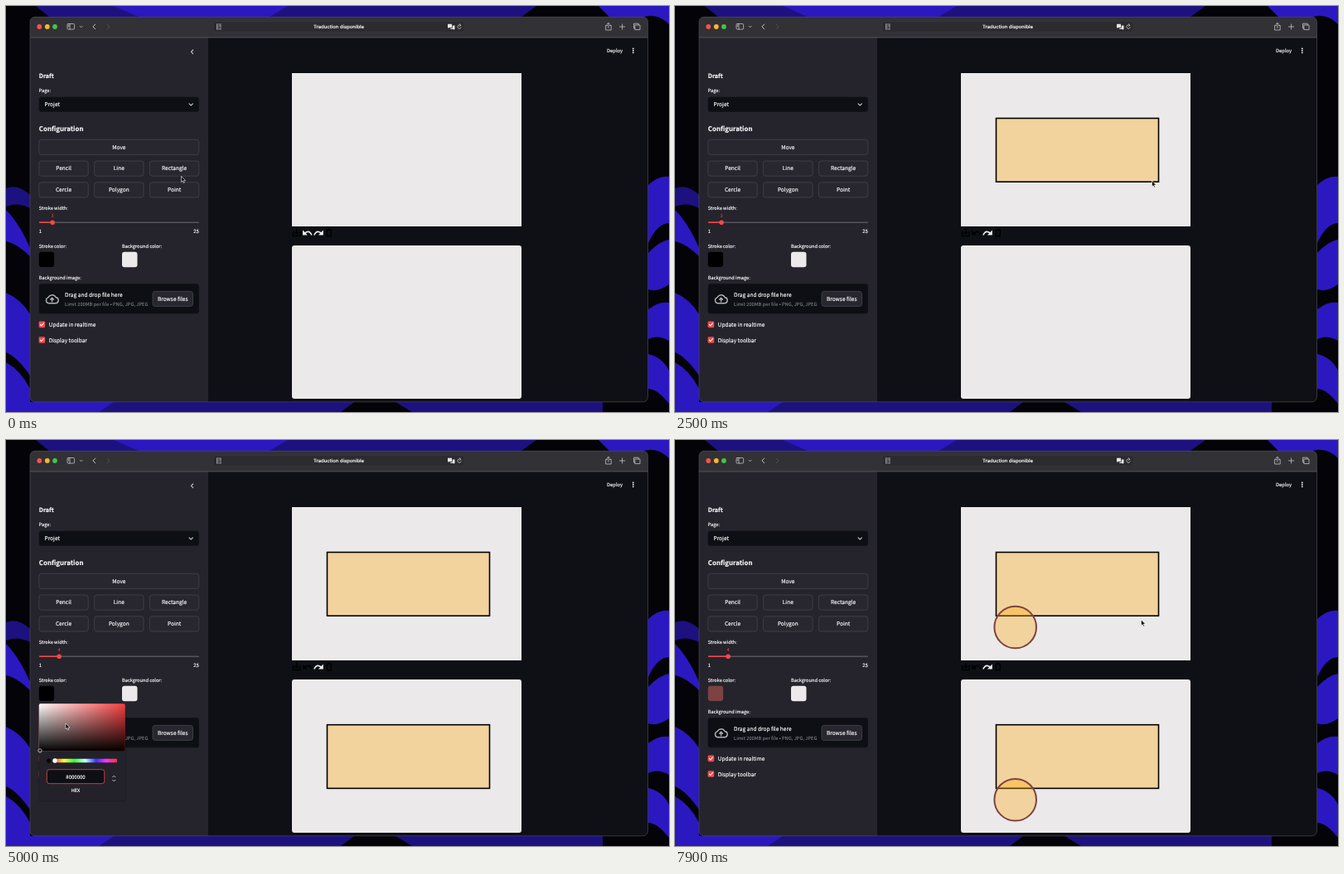
Write an HTML page that moves like this. It is 800 px wide and 490 px high and loops after 8 s.

```html
<!DOCTYPE html>
<html lang="fr">
<head>
<meta charset="utf-8">
<title>Draft</title>
<style>
html, body { margin: 0; width: 100%; height: 100%; overflow: hidden; background: #040308; }
svg { display: block; width: 800px; height: 490px; }
text {
  font: 6.56px "Noto Sans CJK JP", "Noto Sans CJK SC", "Noto Sans CJK KR", "Noto Sans", sans-serif;
  fill: #fafafc; stroke: #fafafc; stroke-width: .16; text-rendering: geometricPrecision;
}
.small { font-size: 5.65px; }
.mid { text-anchor: middle; }
.head { font-size: 7.9px; font-weight: 700; }
.title { font: 500 5.9px Inter, sans-serif; }
.line { fill: none; stroke: #c4c3c8; stroke-linecap: round; stroke-linejoin: round; }
.button { fill: #28272f; stroke: #46454e; stroke-width: .8; }
.paper { fill: #ebe9ea; }
.shape { fill: #ffa500; fill-opacity: .33; }
.red { fill: #f64848; }
</style>
</head>
<body>
<svg viewBox="0 0 800 490">
  <defs>
    <linearGradient id="white"><stop stop-color="#fff"/><stop offset="1" stop-color="#fff" stop-opacity="0"/></linearGradient>
    <linearGradient id="black" x2="0" y2="1"><stop stop-opacity="0"/><stop offset="1"/></linearGradient>
    <linearGradient id="hues">
      <stop stop-color="#f33"/><stop offset=".17" stop-color="#ff3"/><stop offset=".33" stop-color="#3f3"/>
      <stop offset=".5" stop-color="#cff"/><stop offset=".67" stop-color="#33f"/>
      <stop offset=".83" stop-color="#f3f"/><stop offset="1" stop-color="#f33"/>
    </linearGradient>
    <clipPath id="window"><rect x="29" y="13" width="745.5" height="465" rx="6"/></clipPath>
  </defs>

  <!-- wallpaper -->
  <rect width="800" height="490" fill="#040308"/>
  <path fill="#1d1180" d="M36 0H640L622 13H52zM0 220Q14 214 29 228V244Q14 236 0 242zM60 478H420L404 490H80zM470 478H720V490H490z"/>
  <path fill="#2c18c0" d="M130 0H340L318 13H160zM715 0H800V22Q786 8 770 13H728zM0 246Q16 262 29 292V302Q12 286 0 284zM0 346Q18 354 29 372V446Q14 424 0 418zM0 430Q18 440 29 462V478H130L112 490H0zM775 216Q788 204 800 206V262Q786 262 775 286zM775 298Q788 284 800 282V336Q786 346 775 342zM775 366Q788 356 800 358V404Q786 396 775 402zM775 420Q792 424 800 440V480Q786 462 775 462z"/>

  <!-- browser window -->
  <g clip-path="url(#window)">
    <rect x="29" y="13" width="746" height="465" fill="#0e1015"/>
    <rect x="29" y="38" width="215" height="440" fill="#25242c"/>
    <rect x="29" y="13" width="746" height="25" fill="#323136"/>
    <path stroke="#59585d" stroke-width=".9" d="M29 38H775"/>
  </g>
  <rect x="29" y="13.3" width="745.5" height="464.5" rx="6" fill="none" stroke="#4c4b51" stroke-width=".7"/>
  <circle cx="40.3" cy="25" r="2.9" fill="#f5534d"/>
  <circle cx="49.8" cy="25" r="2.9" fill="#f4b62f"/>
  <circle cx="59" cy="25" r="2.9" fill="#42c548"/>
  <rect x="250" y="18.5" width="303" height="13" rx="3" fill="#2c2b30" stroke="#3b3a40" stroke-width=".5"/>
  <g class="line" stroke-width=".8">
    <rect x="74" y="21.5" width="8.6" height="6.6" rx="1.2"/>
    <path d="M77 21.5V28M75.2 23.2H76M75.2 24.7H76M89.2 24.3l1.5 1.5 1.5-1.5"/>
    <path stroke-width="1" d="M107.8 22l-2.9 2.9 2.9 2.9"/>
    <path style="stroke:#58575d" d="M122 22l2.9 2.9-2.9 2.9"/>
    <path d="M254.5 22H259M254.5 24H259M254.5 26H257M254.5 28H259M259 22V28M254.5 22V28" stroke-width=".6"/>
    <path d="M549 23.6A2.3 2.3 0 1 0 549.3 26M547.3 21.7L549 23.4 547.2 24.4"/>
    <path d="M725.5 23.5H723.6V29H730.2V23.5H728.3M726.9 26.3V20.5M725 22.2l1.9-1.9 1.9 1.9M740.5 25H746.7M743.6 21.9V28.1"/>
    <path d="M759 26.8H757.5V21.2H763.2V22.8M759.2 23H765V28.6H759.2z"/>
  </g>
  <path fill="#e5e4e8" d="M533 21.8h5v4.3h-3l-1.3 1.2v-1.2h-.7zM538.7 23.6h2.8v4.4h-.6v1l-1.2-1h-3.4v-1.2h2.4z"/>
  <text class="title mid" x="401.5" y="27.1">Traduction disponible</text>
  <text x="725" y="56" style="font-size:5.85px">Deploy</text>
  <g fill="#f5f5f7"><circle cx="756.8" cy="51.5" r=".9"/><circle cx="756.8" cy="53.9" r=".9"/><circle cx="756.8" cy="56.3" r=".9"/></g>

  <!-- sidebar -->
  <path id="collapse" class="line" stroke-width="1.1" d="M225.7 53l-2.3 2.3 2.3 2.3"/>
  <text class="head" x="39.8" y="87.3" style="font-size:7.2px">Draft</text>
  <text class="small" x="39.8" y="104.2">Page:</text>
  <rect x="39.8" y="109.7" width="193" height="18" rx="3" fill="#0e0f14"/>
  <text x="46.5" y="121.3">Projet</text>
  <path class="line" stroke-width="1.1" d="M221 117.8l2.2 2.2 2.2-2.2"/>
  <text class="head" x="39.8" y="151.2">Configuration</text>
  <g id="buttons"></g>
  <text class="small" x="39.8" y="246.4">Stroke width:</text>
  <rect x="40" y="260.5" width="193" height="1.5" rx=".7" fill="#56555d"/>
  <rect id="track" class="red" x="40" y="260.5" height="1.5" rx=".7"/>
  <circle id="thumb" class="red" cy="261.2" r="2.8"/>
  <text id="width" class="small mid" y="255.2" style="fill:#f64848;stroke:none"></text>
  <text x="39.8" y="273.6" style="font-size:6px">1</text>
  <text x="232.8" y="273.6" text-anchor="end" style="font-size:6px">25</text>
  <text class="small" x="39.8" y="291.5">Stroke color:</text>
  <text class="small" x="140" y="291.5">Background color:</text>
  <rect id="swatch" x="39.8" y="296.8" width="18.3" height="18.3" rx="3"/>
  <rect class="paper" x="140" y="296.8" width="18.5" height="18.5" rx="3"/>
  <text class="small" x="39.8" y="330">Background image:</text>
  <rect x="39.8" y="335.3" width="193" height="36" rx="3" fill="#0e0f14"/>
  <path class="line" style="stroke:#b3b2b8" stroke-width="1.4" d="M51.5 358.8A3.6 3.6 0 0 1 51 351.8A5 5 0 0 1 60 351.5A3.7 3.7 0 0 1 60.2 358.8zM55.6 356.7V352.5M53.7 354.2l1.9-1.9 1.9 1.9"/>
  <text x="71" y="351">Drag and drop file here</text>
  <text x="71" y="362" style="font-size:5.8px;fill:#97969e;stroke:none">Limit 200MB per file • PNG, JPG, JPEG</text>
  <rect class="button" x="177" y="344.4" width="48.5" height="18" rx="3"/>
  <text class="mid" x="201.2" y="355.8">Browse files</text>
  <rect class="red" x="39.6" y="380.6" width="7.6" height="7.6" rx="1.4"/>
  <rect class="red" x="39.6" y="399.2" width="7.6" height="7.6" rx="1.4"/>
  <path class="line" style="stroke:#fff" stroke-width="1.1" d="M41.4 384.5l1.4 1.4 2.7-3M41.4 403.1l1.4 1.4 2.7-3"/>
  <text x="51.7" y="387">Update in realtime</text>
  <text x="51.7" y="405.6">Display toolbar</text>

  <!-- colour picker -->
  <g id="picker">
    <rect x="38.8" y="319" width="106.5" height="118" rx="4" fill="#000" opacity=".15"/>
    <rect x="39.8" y="318.3" width="104" height="117" rx="3" fill="#23222a"/>
    <rect x="39.8" y="318.3" width="104" height="57.5" rx="2" fill="#f53f3f"/>
    <rect x="39.8" y="318.3" width="104" height="57.5" rx="2" fill="url(#white)"/>
    <rect x="39.8" y="318.3" width="104" height="57.5" rx="2" fill="url(#black)"/>
    <circle id="knob" r="2.2" fill="none" stroke="#eee" stroke-width=".7"/>
    <circle id="sample" cx="51.5" cy="387" r="2.5"/>
    <rect x="57" y="384.7" width="77" height="4.6" rx="1" fill="url(#hues)"/>
    <circle cx="59" cy="387" r="2.7" fill="#fff"/>
    <rect x="49.3" y="397.7" width="69.5" height="17" rx="3" fill="#0e0f14" stroke="#d94444" stroke-width=".9"/>
    <text id="hex" class="mid" x="84" y="408.6" style="font-size:6px"></text>
    <text class="small mid" x="84" y="425.2">HEX</text>
    <path class="line" stroke-width="1" d="M128.7 406.8l1.6-1.6 1.6 1.6M128.7 410.3l1.6 1.6 1.6-1.6"/>
  </g>

  <!-- drawing area and preview -->
  <rect class="paper" x="345" y="81" width="277" height="185"/>
  <rect class="paper" x="345" y="289" width="277" height="185" rx="3"/>
  <rect id="box" class="shape" x="387.5" y="135.5" stroke="#000" stroke-width="1.6"/>
  <circle id="disc" class="shape" stroke="#7d4242" stroke-width="2"/>
  <g transform="translate(0 208.2)">
    <rect id="boxCopy" class="shape" x="387.5" y="135.5" width="196" height="76.7" stroke="#000" stroke-width="1.6"/>
    <circle id="discCopy" class="shape" cx="410.7" cy="226" r="25.3" stroke="#7d4242" stroke-width="2"/>
  </g>
  <defs><path id="arrow" d="M358 270.6V276.4H363.8L361.7 274.3Q365.8 271.2 368.2 276.7L369.7 276.2Q366.5 268.6 360.4 273z"/></defs>
  <path fill="none" stroke="#000" stroke-width="1.4" d="M346.5 272V277.5H355V272M350.7 268.5V275M348.4 272.8l2.3 2.3 2.3-2.3M386.5 270.3H393M387.3 271V277.8H392.2V271M388.8 269.2H390.8"/>
  <use id="undo" href="#arrow"/>
  <use href="#arrow" transform="translate(740.8 0) scale(-1 1)" fill="#eee"/>
  <path id="cursor" d="M0 0V6.9L1.6 5.5 2.7 8 3.9 7.5 2.8 5.1H5z" fill="#000" stroke="#fff" stroke-width=".6"/>
</svg>
<script>
const $ = id => document.getElementById(id);
const set = (id, attrs) => {
  for (const [name, value] of Object.entries(attrs)) $(id).setAttribute(name, value);
};
const show = (id, on) => set(id, { visibility: on ? 'visible' : 'hidden' });
const clamp01 = x => Math.min(1, Math.max(0, x));
const mix = (a, b, p) => a + (b - a) * p;
const ease = p => p * p * (3 - 2 * p);

const button = (label, x, y, w) =>
  `<rect class="button" x="${x}" y="${y}" width="${w}" height="18.2" rx="3"/>
   <text class="mid" x="${x + w / 2}" y="${y + 11.4}">${label}</text>`;
$('buttons').innerHTML = button('Move', 39.8, 161.2, 193) +
  ['Pencil', 'Line', 'Rectangle', 'Cercle', 'Polygon', 'Point'].map((label, i) =>
    button(label, 39.8 + i % 3 * 66.8, i < 3 ? 187 : 212.8, 59.4)).join('');

// time, x, y of the pointer tip
const path = [
  [0, 211.5, 205.5], [300, 211.5, 203], [1100, 387, 134], [1300, 387.5, 135.5],
  [2200, 583.5, 212], [2400, 583, 212], [2500, 575.5, 211], [2900, 480, 226],
  [3500, 57, 260], [3700, 56, 260], [4000, 64, 261], [4400, 49, 306],
  [4600, 49, 306], [5000, 72, 342], [5300, 87, 347], [5500, 87, 347],
  [5800, 112, 290], [6100, 71, 222], [6300, 71, 222], [6700, 364.5, 209],
  [6900, 388, 213], [7300, 433.3, 239], [7500, 433.3, 239], [7900, 562.5, 217]
];

function pointer(t) {
  const i = Math.max(1, path.findIndex(k => k[0] >= t));
  const [t0, x0, y0] = path[i - 1], [t1, x1, y1] = path[i];
  const p = ease(clamp01((t - t0) / (t1 - t0)));
  return [mix(x0, x1, p), mix(y0, y1, p)];
}

function draw(t) {
  const [x, y] = pointer(t);
  set('cursor', { transform: `translate(${x} ${y})` });
  show('collapse', x < 244);

  const grow = ease(clamp01((t - 1300) / 900));
  set('box', { width: 196 * grow, height: 76.7 * grow });
  show('box', t > 1300);
  show('boxCopy', t >= 2800);
  set('undo', { fill: t < 2400 ? '#eee' : '#000' });

  // the disc spans from the press point to the pointer
  const spread = ease(clamp01((t - 6900) / 400));
  set('disc', { cx: mix(388, 410.7, spread), cy: mix(213, 226, spread), r: 25.3 * spread });
  show('disc', t > 6900);
  show('discCopy', t >= 7700);

  const width = t < 3900 ? 3 : 4, end = 40 + (width - 1) * 8.04;
  set('track', { width: end - 40 });
  set('thumb', { cx: end });
  set('width', { x: end });
  $('width').textContent = width;

  const picked = t >= 5300, color = picked ? '#7d4242' : '#000000';
  show('picker', t >= 4500 && t < 5800);
  set('knob', picked ? { cx: 88.7, cy: 347 } : { cx: 41, cy: 375 });
  set('sample', { fill: color });
  set('swatch', { fill: color });
  $('hex').textContent = color;
}

function frame() {
  draw(Math.floor(performance.now() % 8000 / 100) * 100);
  requestAnimationFrame(frame);
}
frame();
</script>
</body>
</html>
```
